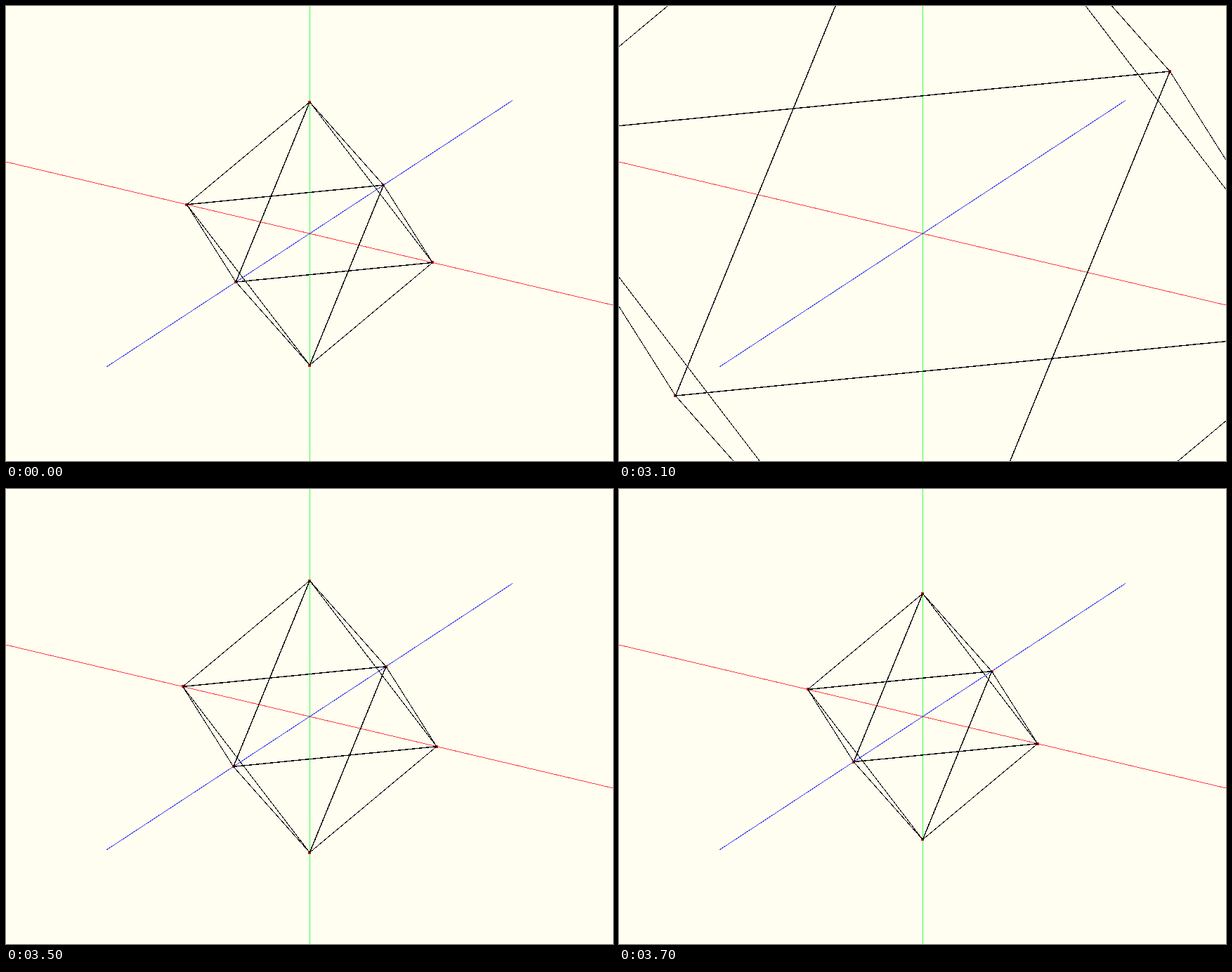
An HTML page that plays this animation: 864x648 px, repeating every 4200 ms.

```html
<!DOCTYPE html>
<html lang="en">
<head>
<meta charset="utf-8">
<title>Pulsing octahedron</title>
<style>
html, body { margin: 0; width: 100%; height: 100%; overflow: hidden; background: #fffef0; }
svg { display: block; width: 864px; height: 648px; }
path { fill: none; shape-rendering: crispEdges; }
</style>
</head>
<body>
<svg viewBox="0 0 864 648">
  <path d="M0 222L864 426" stroke="#ff4040"/>
  <path d="M432.5 0V648" stroke="#40ff40"/>
  <path d="M143 514L721 134.500" stroke="#4040ff"/>
  <path id="dots" stroke="#d01010" stroke-width="4"/>
  <path id="thin" stroke="#000"/>
  <path id="bold" stroke="#000" stroke-width="1.4"/>
</svg>
<script>
const LOOP = 4200;
// [start time in ms, size of the solid]
const steps = [
  [0, 1], [3000, 1.166], [3100, 3.348], [3300, 2.69],
  [3400, 1.8], [3500, 1.033], [3600, 0.85], [3700, 0.935]
];
// Half axes of the solid: X points right, Y up, Z to the back
const axes = { X: [174.9, 41.3], Y: [0, -187.4], Z: [105.1, -69] };
const corners = ["X", "x", "Y", "y", "Z", "z"];
const thinEdges = ["Yx", "YX", "YZ", "yx", "yX", "yz", "xz", "XZ"];
const boldEdges = ["xZ", "Xz", "Yz", "yZ"];
const [dots, thin, bold] = ["dots", "thin", "bold"].map(id => document.getElementById(id));

function point(name, size) {
  const axis = name.toUpperCase();
  const k = name === axis ? size : -size;
  return [432.3 + axes[axis][0] * k, 324.1 + axes[axis][1] * k];
}

function lines(edges, size) {
  return edges.map(([a, b]) => `M${point(a, size)}L${point(b, size)}`).join("");
}

function draw(now) {
  const t = now % LOOP;
  const size = steps.findLast(([start]) => t >= start)[1];
  dots.setAttribute("d", corners.map(c => `M${point(c, size)}m-2 0h4`).join(""));
  thin.setAttribute("d", lines(thinEdges, size));
  bold.setAttribute("d", lines(boldEdges, size));
}

function frame() {
  draw(performance.now());
  requestAnimationFrame(frame);
}
frame();
</script>
</body>
</html>
```
